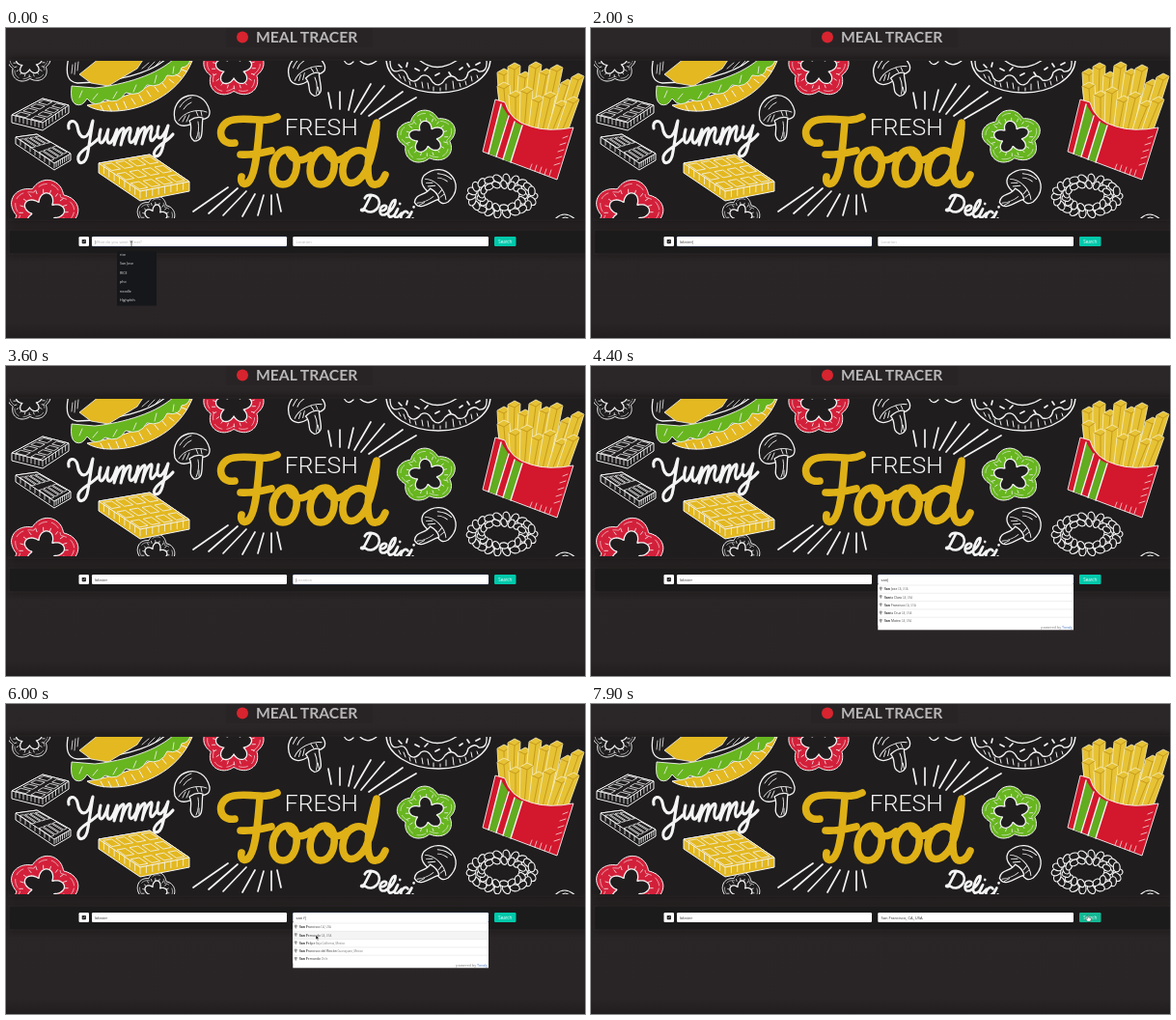
An HTML page that plays this animation: 600x321 px, repeating every 8000 ms.

```html
<!DOCTYPE html>
<html lang="en">
<head>
<meta charset="utf-8">
<title>Meal Tracer</title>
<style>
  html, body { margin: 0; width: 100%; height: 100%; overflow: hidden; background: #292526; }
  svg { display: block; width: 600px; height: 321px; }
  text { white-space: pre; }
  .ui { font: 4.1px "Open Sans", sans-serif; fill: #333; }
  .hint { fill: #b4b4b4; }
  .line { fill: none; stroke: #f4f4f4; stroke-linecap: round; stroke-linejoin: round; }
  .dark { fill: #1f1d1e; stroke: #f4f4f4; stroke-linejoin: round; }
</style>
</head>
<body>
<svg viewBox="0 0 600 321">
  <defs>
    <clipPath id="frame"><rect x="3" y="34" width="597" height="163"/></clipPath>
    <filter id="blur" x="-10%" y="-20%" width="120%" height="140%"><feGaussianBlur stdDeviation="4"/></filter>
    <linearGradient id="page" x2="0" y2="1">
      <stop offset="0" stop-color="#2b2627"/><stop offset=".95" stop-color="#292425"/><stop offset="1" stop-color="#211e1f"/>
    </linearGradient>
    <g id="mushroom" class="dark" stroke-width="1.3">
      <path d="M-18 7C-24-20 12-29 18-2C19 9 8 5 3 9C-4 14-14 16-18 7Z"/>
      <path d="M-3 8C2 16-6 23 2 29C13 29 9 17 11 5C4 3 0 6-3 8Z"/>
      <path class="line" stroke-width=".9" d="M-14 8C-9-1 5-5 15-1M-10 9L-7 3M-6 9L-3 2M6 3L4-2M10 3L9-2M-13-6Q-8-14-1-16M-9-4Q-6-9-1-11M4 27Q8 18 6 9M7 26L7 20"/>
    </g>
  </defs>

  <rect width="600" height="321" fill="url(#page)"/>
  <rect x="228" width="152" height="20" fill="#282425"/>
  <circle cx="245" cy="9.5" r="6" fill="#d8242f"/>
  <text x="259" y="14.7" font-family="Lato, sans-serif" font-weight="700" font-size="15.7" fill="#b9b7b8">MEAL TRACER</text>

  <rect x="2" y="32" width="602" height="168" fill="#100e0f" opacity=".5" filter="url(#blur)"/>
  <g clip-path="url(#frame)">
    <rect y="34" width="600" height="163" fill="#1f1d1e"/>

    <g id="burger" stroke-linejoin="round">
      <path class="dark" stroke-width="1.3" d="M65 30C61 48 64 56 74 57C112 56 150 48 168 30Z"/>
      <path d="M76 48L88 57L106 60L136 42L144 30L96 32Z" fill="#e3b820" stroke="#f4f4f4" stroke-width=".8"/>
      <path d="M84 80C104 94 172 86 193 34L182 34C160 60 120 74 84 80Z" fill="#e3b820" stroke="#f4f4f4"/>
      <path d="M68 60Q66 76 72 79Q79 82 84 73Q92 84 103 74Q116 80 124 67Q139 72 146 59Q161 63 167 49Q180 52 182 41Q190 40 191 32L174 32C152 52 112 60 92 62Z" fill="#67b51f" stroke="#f4f4f4" stroke-width=".9"/>
      <path class="line" stroke-width=".8" d="M69 38l-1 9M72 36l-1 12M75 35l-1 9M148 36l-7 6M154 35l-7 7M160 34l-7 7M76 72l3-7M90 74l5-6M111 73l4-7M132 66l3-7M154 57l2-8M173 47l1-7"/>
      <path class="line" stroke-width="1" d="M98 80l3 6M106 80l3 6M114 78l3 7M122 76l3 7M130 73l4 6M138 69l4 7M146 65l4 6M154 61l4 5M162 57l4 5M169 53l5 4M176 48l5 3M182 43l5 2"/>
    </g>

    <g id="peppers"></g>
    <use href="#mushroom" transform="translate(193 88)"/>
    <use href="#mushroom" transform="translate(312 44) rotate(-12) scale(1.05 .95)"/>
    <use href="#mushroom" transform="translate(448 165) rotate(62)"/>
    <g id="waffles"></g>

    <path class="line" stroke-width="1.2" d="M568 199Q578 187 591 199M575 199Q579 193 585 199M350 33Q354 41 360 35M366 33Q374 42 384 34"/>
    <g class="line" id="rays" stroke-width="1.7"></g>

    <g class="line" stroke-width="3.1">
      <path d="M65 104C63 95 72 94 74 102C76 116 85 118 89 99L90 96L85 128C83 143 73 142 75 133C77 126 88 123 95 115"/>
      <path d="M98 105C94 121 100 126 106 105C103 120 107 124 112 113L115 105L112 121C116 107 123 99 122 107L119 121C123 106 130 98 129 107C126 118 129 124 135 112L137 104L134 120C138 106 145 98 144 106L141 120C145 105 152 97 151 105C148 117 150 121 156 111"/>
      <path d="M158 102C154 117 161 119 168 101L162 125C159 136 151 134 154 128C157 121 168 117 173 110"/>
    </g>

    <g fill="none" stroke="#dfb117" stroke-width="7.6" stroke-linecap="round" stroke-linejoin="round">
      <path d="M237 119C219 122 217 98 236 95C254 92 268 99 281 92"/>
      <path d="M263 97C261 120 260 140 255 153C250 166 242 162 244 154M243 131Q256 132 275 127"/>
      <path d="M292 126C274 126 270 162 287 162C304 162 306 126 292 126C296 139 307 139 316 132"/>
      <path d="M331 126C313 126 309 162 326 162C343 162 345 126 331 126C335 139 345 139 353 132"/>
      <path d="M376 133C369 121 351 127 349 146C348 165 364 165 373 148C380 132 384 112 384 98C376 123 370 159 381 162C388 163 391 157 393 152"/>
    </g>
    <text x="288.8" y="111" font-family="Roboto, sans-serif" font-weight="300" font-size="24.8" fill="#f6f6f6">FRESH</text>

    <g class="line" stroke-width="2.9" transform="translate(373 171) rotate(13) scale(.92)">
      <path d="M6 2C4 9 3 15 1 20C-3 21 0 17 4 19C14 23 21 10 15 3C10-1 1 0 0 6"/>
      <path d="M20 16C28 14 27 7 23 9C18 12 19 22 26 19C33 14 36 4 34 0C30 0 27 18 32 20Q36 19 38 14L39 9C36 17 37 21 41 18L44 13M40 3v.1M51 11C47 7 43 15 45 19C48 22 52 18 54 13L55 9C52 17 53 21 58 16M56 3v.1"/>
    </g>

    <g id="donut">
      <ellipse class="dark" cx="448" cy="32" rx="54" ry="35" stroke-width="1.4"/>
      <path class="line" stroke-width="1.3" d="M398 34Q398 48 408 44Q414 42 417 52Q423 59 430 50Q437 46 442 56Q449 63 455 53Q462 46 468 54Q477 56 479 46Q486 40 490 45Q499 46 498 34M428 33Q446 48 468 33"/>
      <path class="line" stroke-width="1.7" d="M407 38l3 3M416 36l-1 4M424 42l4 2M434 44l3-3M445 49l4-2M459 46l2 3M470 43l3-2M478 37l2 3M487 38l4-2"/>
      <path class="line" stroke-width="1" d="M407 48l2 4M412 50l2 5M418 55l1 4M424 57l1 4M431 56l1 6M437 57l1 6M443 61l0 4M450 62l0 3M456 58l0 6M463 55l1 8M470 57l1 4M476 55l1 4M482 50l1 5M488 49l1 3"/>
    </g>
    <g class="dark" id="curl" stroke-width="1.2"></g>

    <g id="fries" stroke-linejoin="round"></g>
    <g stroke-linejoin="round">
      <path d="M507 74L517 77Q522 96 544 102Q562 108 588 103L571 157L494 128Z" fill="#d3172c" stroke="#f4f4f4" stroke-width=".9"/>
      <path d="M513 79L520 90L508 133L500 130ZM527 97L535 101L523 139L515 136Z" fill="#62ac20"/>
      <path class="line" stroke-width="1.4" d="M513 79L500 130M521 91L508 133M527 97L515 136M535 101L523 139"/>
      <path class="line" stroke-width=".7" d="M545 141l-2 5M550 142l-2 6M555 144l-2 6M560 146l-2 6M565 147l-2 6M582 112l-5 2M580 119l-6 2M578 126l-6 2M576 133l-6 2M574 140l-6 2"/>
    </g>
  </g>

  <rect x="2" y="208" width="602" height="27" fill="#100e0f" opacity=".3" filter="url(#blur)"/>
  <rect x="4" y="210" width="596" height="23" fill="#1c1b1b"/>
  <rect x="75.5" y="216" width="10.5" height="10" rx="1.2" fill="#fff"/>
  <rect x="78.7" y="219" width="4.2" height="4.2" rx=".6" fill="#222"/>
  <path d="M79.8 222l2-2" stroke="#fff" stroke-width=".5"/>
  <rect id="ring" y="215.5" height="11" rx="1.6" fill="#3273dc" opacity=".25"/>
  <rect x="89" y="216" width="202" height="10" rx="1.2" fill="#fff"/>
  <rect x="297.3" y="216" width="202.7" height="10" rx="1.2" fill="#fff"/>
  <text id="dish" class="ui" x="91.8" y="222.5"></text>
  <text id="place" class="ui" x="300.5" y="222.5"></text>
  <rect id="button" x="506" y="216" width="22.5" height="10" rx="1.2"/>
  <text class="ui" x="510.3" y="222.6" style="fill:#fff;font-size:4.4px">Search</text>
  <g id="recent"></g>
  <g id="places"></g>
  <g id="pointer"></g>
</svg>
<script>
const $ = id => document.getElementById(id);
const range = n => [...Array(n).keys()];
const poly = pts => 'M' + pts.map(p => p.map(v => v.toFixed(1)).join(' ')).join('L') + 'Z';
const mix = (a, b, k) => a.map((v, i) => v + (b[i] - v) * k);

// Pepper slices: rounded lobes around a hollow centre
function pepper(cx, cy, rx, ry, lobes, turn, color) {
  const blob = (s, wave) => poly(range(120).map(i => {
    const a = i * Math.PI / 60, r = s * (1 - wave + wave * Math.abs(Math.cos(lobes * a / 2 + turn)));
    return [cx + rx * r * Math.cos(a), cy + ry * r * Math.sin(a)];
  }));
  const ticks = range(lobes * 4).map(i => {
    const a = i * Math.PI / lobes / 2 + .3, c = Math.cos(a), s = Math.sin(a);
    return `M${cx + rx * .6 * c} ${cy + ry * .6 * s}L${cx + rx * .7 * c} ${cy + ry * .7 * s}`;
  }).join('');
  return `<path d="${blob(1, .22)}" fill="${color}" stroke="#f4f4f4" stroke-width="1"/>
    <path d="${blob(.88, .24)}" class="line" stroke-width=".6" stroke-dasharray="9 5"/>
    <path d="${blob(.6, .45)}" class="dark" stroke-width="1.3"/>
    <path d="${ticks}" class="line" stroke-width=".8"/>`;
}
$('peppers').innerHTML =
  pepper(236, 42, 32, 30, 5, .8, '#d3203a') +
  pepper(436, 113, 31, 28, 5, 1.1, '#67b51f') +
  pepper(39, 191, 36, 34, 5, .3, '#d3203a') +
  pepper(24, 36, 23, 21, 5, .9, '#1f1d1e') +
  pepper(155, 196, 20, 22, 5, .4, '#1f1d1e');

// Waffles: a slanted slab with sunken cells and a hatched edge
function waffle(corners, n, m, depth, fill) {
  const [a, b, c, d] = corners, down = p => [p[0], p[1] + depth];
  const spot = (u, v) => mix(mix(a, b, u), mix(d, c, u), v);
  let cells = '';
  for (const i of range(n)) for (const j of range(m)) {
    const u = (i + .18) / n, v = (j + .18) / m, du = .64 / n, dv = .64 / m;
    cells += poly([spot(u, v), spot(u + du, v), spot(u + du, v + dv), spot(u, v + dv)]);
  }
  const hatch = range(15).map(i => `M${i < 8 ? mix(d, c, i / 8) : mix(a, d, (i - 7) / 8)}v${depth * .7}`).join('');
  const body = `class="dark" style="fill:${fill}"`;
  return `<path ${body} d="${poly([a, b, c, down(c), down(d), down(a)])}"/><path ${body} d="${poly(corners)}"/>
    <path class="line" stroke-width=".8" d="${cells + hatch}"/>`;
}
$('waffles').innerHTML =
  waffle([[6, 90], [38, 73], [65, 80], [38, 98]], 4, 2, 8, '#1f1d1e') +
  waffle([[10, 113], [32, 110], [67, 130], [50, 140]], 4, 2, 7, '#1f1d1e') +
  waffle([[96, 140], [149, 131], [190, 159], [139, 169]], 4, 3, 10, '#e3b820');

$('rays').innerHTML = [
  [334, 67, 337, 83], [346, 66, 346, 84], [360, 64, 355, 85], [378, 58, 361, 87],
  [392, 60, 368, 89], [411, 66, 376, 91], [425, 72, 387, 94],
  [230, 165, 194, 190], [240, 166, 210, 192], [249, 169, 225, 194],
  [258, 172, 245, 195], [267, 173, 261, 194], [275, 173, 275, 193], [281, 172, 285, 190]
].map(([a, b, c, d]) => `<path d="M${a} ${b}L${c} ${d}"/>`).join('');

$('curl').innerHTML = [[32, 18, 22, 5], [22, 12, 17, 4.4]].map(([rx, ry, n, r]) => range(n).map(i => {
  const a = i * 2 * Math.PI / n, x = 514 + rx * Math.cos(a), y = 174 + ry * Math.sin(a);
  return `<ellipse cx="${x}" cy="${y}" rx="${r}" ry="${r * .7}" transform="rotate(${i * 47} ${x} ${y})"/>`;
}).join('')).join('');

// Fries: two fanned rows of bars
const fry = (x, y, tx, ty) => `<path d="M${x - 5} ${y}L${tx - 6} ${ty}L${tx + 1} ${ty - 4}L${tx + 7} ${ty - 1}L${x + 6} ${y + 2}Z" fill="#e6c235" stroke="#f7efc4" stroke-width=".8"/>
  <path d="M${tx - 6} ${ty}L${tx + 1} ${ty + 3}L${tx + 7} ${ty - 1}M${tx + 1} ${ty + 3}L${x} ${y}" fill="none" stroke="#b98a10" stroke-width=".7"/>`;
const tops = [46, 40, 49, 39, 46, 42, 57, 51];
$('fries').innerHTML =
  tops.map((y, i) => fry(517 + 8 * i, 98 + 2 * i, 515 + 11 * i, y)).join('') +
  range(7).map(i => fry(519 + 9 * i, 102 + 2 * i, 515 + 12 * i, 60 + (i * 7) % 13 + i * 2)).join('');

// Suggestion lists
$('recent').innerHTML = '<rect x="115" y="231.5" width="41" height="56" fill="#15171a"/>' +
  ['rice', 'San Jose', 'RICE', 'pho', 'noodle', 'Highphth'].map((s, i) =>
    `<text class="ui" x="118" y="${235.7 + i * 9.5}" style="fill:#eee;font-size:3.6px">${s}</text>`).join('');

const near = [['San Jose', 'CA, USA'], ['Santa Clara', 'CA, USA'], ['San Francisco', 'CA, USA'],
  ['Santa Cruz', 'CA, USA'], ['San Mateo', 'CA, USA']];
const narrowed = [['San Francisco', 'CA, USA'], ['San Fernando', 'CA, USA'], ['San Felipe', 'Baja California, Mexico'],
  ['San Francisco del Rincón', 'Guanajuato, Mexico'], ['San Fernando', 'Chile']];

function placeList(rows, bold, hover) {
  return '<rect x="297.3" y="226" width="202.7" height="47.3" fill="#fff"/>' + rows.map(([name, area], i) => {
    const y = 227 + i * 8.3;
    return `<rect x="297.3" y="${y}" width="202.7" height="8.3" fill="${i === hover ? '#f4f4f4' : '#fff'}"/>
      <path d="M297.3 ${y}h202.7" stroke="#dedede" stroke-width=".5"/>
      <path d="M300.3 ${y + 6}l-1.3-2.5a1.4 1.4 0 1 1 2.6 0z" fill="#999"/>
      <text class="ui" x="304" y="${y + 5.2}" style="font-size:3.35px"><tspan font-weight="700">${name.slice(0, bold)}</tspan>${name.slice(bold)}<tspan fill="#777" font-size="2.85"> ${area}</tspan></text>`;
  }).join('') + `<text class="ui" x="499" y="271.6" text-anchor="end" style="font-size:3.8px;fill:#777">powered by <tspan fill="#4a78c8">Tovaly</tspan></text>`;
}

const shapes = {
  beam: '<path d="M-1.3-2.8Q0-2.8 0-2Q0-2.8 1.3-2.8M0-2V2.4M-1.3 3.2Q0 3.2 0 2.4Q0 3.2 1.3 3.2" fill="none" stroke="#222" stroke-width=".7"/>',
  arrow: '<path d="M0-2V3L1.2 2L2 3.9L2.9 3.5L2.1 1.7H3.6Z" fill="#111" stroke="#fff" stroke-width=".5"/>',
  hand: '<path d="M-.6-2.6Q.3-3.2.6-2.2V-.4L2.8.2Q3.5.5 3.2 1.8L2.5 3.6H-.5L-2.4 1.2Q-2.3.2-.6 1Z" fill="#fff" stroke="#222" stroke-width=".4"/>',
  none: ''
};

// Timelines: [start ms, value...]
const dishSteps = [[0, ''], [500, 'l'], [700, 'lo'], [1000, 'lob'], [1200, 'lobs'], [1500, 'lobst'], [1700, 'lobste'], [1900, 'lobster']];
const placeSteps = [[0, ''], [3700, 's'], [3900, 'sa'], [4200, 'san'], [4600, 'san '], [4900, 'san f'], [6300, 'San Francisco, CA, USA']];
const looks = [[0, 'beam'], [400, 'none'], [2500, 'beam'], [2850, 'arrow'], [3000, 'beam'], [3600, 'none'],
  [5500, 'beam'], [5700, 'arrow'], [7600, 'hand']];
const moves = [[0, 130, 223.5], [2400, 130, 223.5], [2900, 296, 223], [3200, 318, 221], [5500, 318, 221],
  [5900, 321, 241], [6050, 321, 241], [6300, 324, 233], [7200, 324, 233], [7700, 515, 221.5], [8000, 515, 221.5]];

const at = (steps, t) => steps.filter(s => s[0] <= t).pop()[1];
function along(t) {
  const i = moves.findIndex(m => m[0] > t), a = moves[i - 1], b = moves[i];
  const k = (t - a[0]) / (b[0] - a[0]);
  return mix(a, b, k * k * (3 - 2 * k)).slice(1);
}

const cache = {};
function put(id, html) {
  if (cache[id] !== html) $(id).innerHTML = cache[id] = html;
}

function field(id, value, hint, focus) {
  const bar = focus ? '<tspan dx="-.7" fill="#222">|</tspan>' : '';
  put(id, value ? value + bar : bar + `<tspan class="hint"${focus ? ' dx="-1.2"' : ''}>${hint}</tspan>`);
}

function draw() {
  const t = Math.floor(performance.now() % 8000 / 100) * 100;
  const place = at(placeSteps, t), first = t < 3200, focused = t < 6300;
  field('dish', at(dishSteps, t), 'What do you want to eat?', first);
  field('place', place, 'Location', !first && focused);
  $('ring').setAttribute('x', first ? 88.5 : 296.8);
  $('ring').setAttribute('width', first ? 203 : 203.7);
  $('ring').style.display = focused ? '' : 'none';
  $('recent').style.display = t < 500 ? '' : 'none';

  const open = t >= 3900 && focused, late = t >= 5000;
  const hover = t < 5700 ? -1 : t < 6200 ? 1 : 0;
  put('places', open ? placeList(late ? narrowed : near, place.length, hover) : '');

  $('button').setAttribute('fill', t >= 7600 ? '#14b894' : '#00c9ab');
  put('pointer', shapes[at(looks, t)]);
  $('pointer').setAttribute('transform', `translate(${along(t)})`);
  requestAnimationFrame(draw);
}
draw();
</script>
</body>
</html>
```
